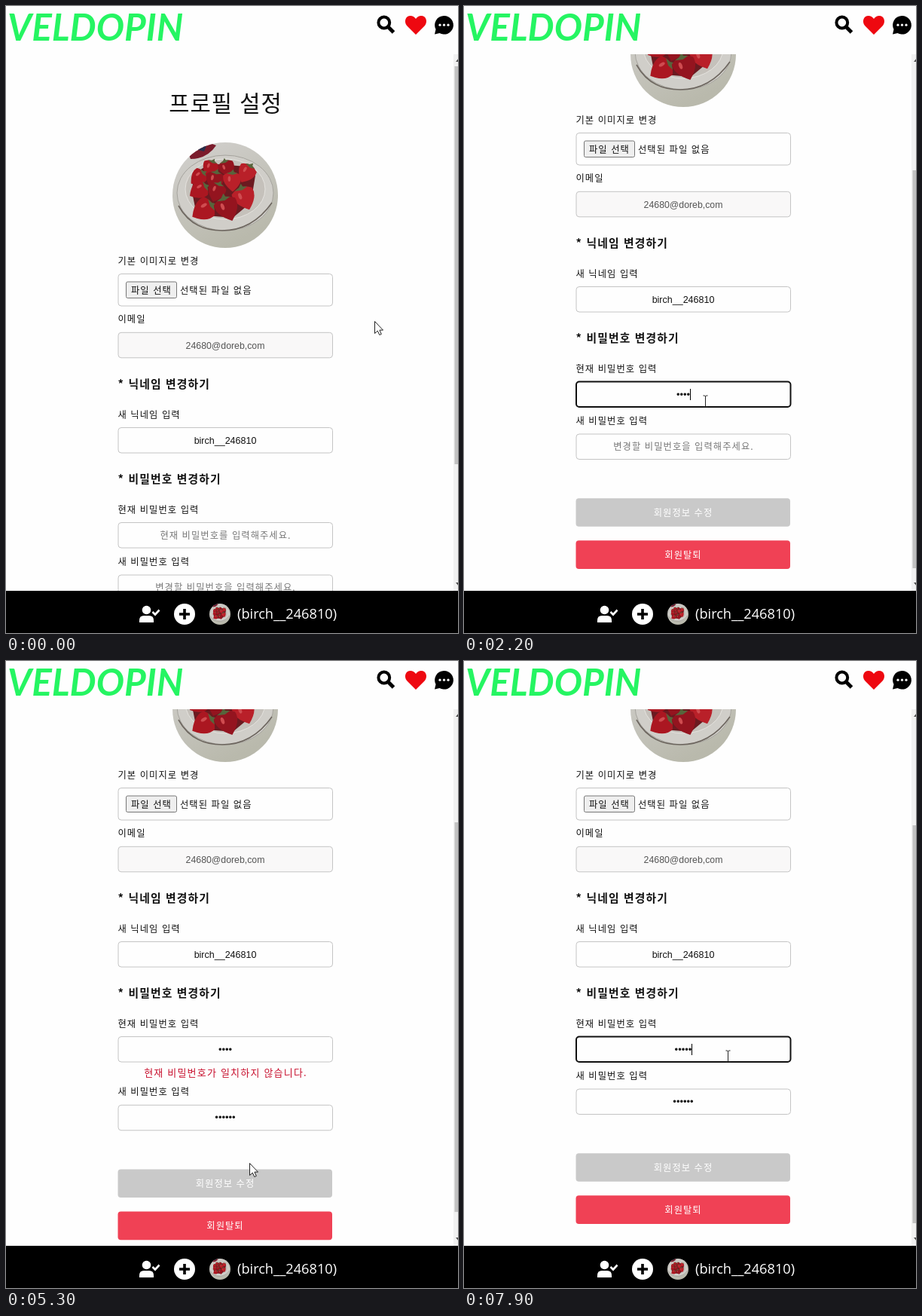
An HTML page that plays this animation: 600 by 832 pixels, repeating every 8 s.

```html
<!DOCTYPE html>
<html lang="ko">
<head>
<meta charset="utf-8">
<title>프로필 설정</title>
<style>
  html, body { margin: 0; width: 100%; height: 100%; overflow: hidden; background: #fefefe; }
  svg { display: block; }
  text { font: 12.3px "Liberation Sans", "Noto Sans CJK KR", "Noto Sans CJK", sans-serif; fill: #111; }
  .ko { font-family: "Noto Sans CJK KR", "Noto Sans CJK", sans-serif; letter-spacing: 1.05px; }
  .mid { text-anchor: middle; }
  .title { font-size: 29.6px; font-weight: 300; letter-spacing: 1px; }
  .head { font-size: 14.8px; font-weight: 700; letter-spacing: 1.15px; }
  .hint { fill: #777; }
  .white { fill: #fff; }
  .error { font-size: 13px; letter-spacing: 1.2px; fill: #c8102e; }
  .mail { fill: #545454; }
  .nick { font-size: 12.5px; }
  .dots { font-size: 13px; }
  .brand { font: italic 700 49.5px Lato, sans-serif; fill: #25f562; }
  .user { font: 18.2px "Open Sans", "Noto Sans", sans-serif; fill: #fff; }
  .box { fill: #fefefe; stroke: #c4c4c4; }
  .focus { stroke: #101010; stroke-width: 2; }
</style>
</head>
<body>
<svg width="600" height="832" viewBox="0 0 600 832">
  <defs>
    <clipPath id="view"><rect y="64" width="600" height="712"/></clipPath>
    <clipPath id="disc"><circle r="70"/></clipPath>
    <linearGradient id="table" x2=".5" y2="1">
      <stop stop-color="#d3d1cf"/><stop offset="1" stop-color="#b9b9ac"/>
    </linearGradient>
    <g id="photo" clip-path="url(#disc)">
      <rect x="-70" y="-70" width="140" height="140" fill="url(#table)"/>
      <path d="M-50-58Q-30-76-12-66Q-24-48-46-48Z" fill="#7b1c2c"/>
      <path d="M-44-62L-24-68L-28-58Z" fill="#26304c"/>
      <ellipse cy="-3" rx="64" ry="50" fill="#d0cec9" stroke="#a5a39d"/>
      <ellipse cy="-8" rx="53" ry="40" fill="#c5c1bb" stroke="#e4e2de"/>
      <path d="M-62 14Q-44 47-4 47T62 10" fill="none" stroke="#6d665f" stroke-width="1.6"/>
      <path d="M-42-28L-20-42L28-38L40-26L34 10L10 30L-38 26L-44-4Z" fill="#6b1a20"/>
      <g id="fruit"></g>
    </g>
  </defs>

  <rect width="600" height="832" fill="#fefefe"/>

  <g clip-path="url(#view)">
    <g id="page">
      <text class="ko title mid" x="291.5" y="140">프로필 설정</text>
      <use href="#photo" x="291" y="251"/>
      <text class="ko" x="148.5" y="342.5">기본 이미지로 변경</text>
      <rect class="box" x="149" y="355.5" width="284.5" height="42.5" rx="4"/>
      <rect x="159.5" y="366" width="67" height="21.5" rx="2" fill="#efefef" stroke="#777"/>
      <text class="ko" x="166" y="381.5">파일 선택</text>
      <text class="ko" x="231" y="381.5">선택된 파일 없음</text>
      <text class="ko" x="148.5" y="420">이메일</text>
      <rect class="box" x="149" y="433.3" width="284.5" height="33.5" rx="4" style="fill:#f9f8f8"/>
      <text class="mail mid" x="291" y="454.5">24680@doreb,com</text>
      <text class="ko head" x="148.5" y="506.7">* 닉네임 변경하기</text>
      <text class="ko" x="148.5" y="546.5">새 닉네임 입력</text>
      <rect class="box" x="149" y="559.5" width="284.5" height="33.5" rx="4"/>
      <text class="nick mid" x="291" y="580.5">birch__246810</text>
      <text class="ko head" x="148.5" y="632.7">* 비밀번호 변경하기</text>
      <text class="ko" x="148.5" y="672.5">현재 비밀번호 입력</text>
      <g id="current">
        <rect class="box" x="149" y="685.5" width="284.5" height="33.5" rx="4"/>
        <text class="ko hint mid" x="291.5" y="706.5">현재 비밀번호를 입력해주세요.</text>
        <text class="dots mid" x="291" y="707"></text>
        <rect class="caret" y="695" width="1" height="15"/>
      </g>
      <text class="ko error mid" id="error" x="291.5" y="738">현재 비밀번호가 일치하지 않습니다.</text>
      <g id="lower">
        <text class="ko" x="148.5" y="742">새 비밀번호 입력</text>
        <g id="next">
          <rect class="box" x="149" y="755" width="284.5" height="33.5" rx="4"/>
          <text class="ko hint mid" x="291.5" y="775.5">변경할 비밀번호을 입력해주세요.</text>
          <text class="dots mid" x="291" y="776"></text>
          <rect class="caret" y="764" width="1" height="15"/>
        </g>
        <rect x="148.5" y="840.3" width="284.5" height="37.5" rx="4" fill="#c9c9c9"/>
        <text class="ko white mid" x="291" y="864">회원정보 수정</text>
        <rect x="148.5" y="896.2" width="284.5" height="37.7" rx="4" fill="#f04155"/>
        <text class="ko white mid" x="291" y="920">회원탈퇴</text>
      </g>
    </g>
    <rect x="594" y="64" width="6" height="712" fill="#f1f1f1"/>
    <rect id="thumb" x="595.5" width="5" fill="#c1c1c1"/>
    <path d="M597 74L601 69V74ZM597 765L601 770V765Z" fill="#505050"/>
  </g>

  <text class="brand" x="2" y="46">VELDOPIN</text>
  <g fill="none" stroke="#000" stroke-width="4">
    <circle cx="501.8" cy="22" r="7.4"/>
    <path d="M507 27.5L514.5 35" stroke-width="5"/>
  </g>
  <path d="M544 38L532 26C528 21 530 13 537 13Q541 13 544 17Q547 13 551 13C558 13 560 21 556 26Z" fill="#ee0810"/>
  <path d="M581.5 13A12.3 12.3 0 1 1 575.5 36L569 37.5L570.5 31A12.3 12.3 0 0 1 581.5 13Z"/>
  <g fill="#fff"><circle cx="576" cy="25.2" r="1.6"/><circle cx="581.5" cy="25.2" r="1.6"/><circle cx="587" cy="25.2" r="1.6"/></g>

  <rect y="776" width="600" height="56"/>
  <g fill="#fff">
    <circle cx="186.5" cy="801.5" r="5.8"/>
    <path d="M177 818V815Q177 809 183 809H190Q196 809 196 815V818Z"/>
    <path d="M194.5 804L198 807.5L203.5 801.5" fill="none" stroke="#fff" stroke-width="2.6"/>
    <circle cx="237" cy="807" r="14"/>
  </g>
  <path d="M230 807H244M237 800V814" stroke="#000" stroke-width="3.6"/>
  <use href="#photo" transform="translate(284 807) scale(.2)"/>
  <text class="user" x="307" y="812.5">(birch__246810)</text>

  <path id="arrow" d="M0 0V16L3.8 12.6L6.3 18L8.8 16.9L6.4 11.6H11Z" fill="#fff" stroke="#222"/>
  <path id="beam" d="M-3-7.5H-1L0-6.5L1-7.5H3M0-6.5V6.5M-3 7.5H-1L0 6.5L1 7.5H3" fill="none" stroke="#222"/>
</svg>
<script>
  const LOOP = 8000, STEP = 100;
  const $ = q => document.querySelector(q);

  // Strawberries around the photo's centre: x, y, tilt, size
  const berries = [[-20, -36, 20, .8], [2, -36, -20, .8], [28, -30, 30, .9], [-36, -24, 50, .8],
    [-14, -20, 10, .9], [9, -19, 0, .9], [-35, -7, 60, .9], [-12, -5, 20, .9],
    [25, 3, -20, 1.1], [-29, 19, 60, 1.1], [2, 17, -20, 1.15]];
  $('#fruit').innerHTML = berries.map(([x, y, tilt, size], i) => `
    <g transform="translate(${x} ${y}) rotate(${tilt}) scale(${size})">
      <path d="M-13-8Q0-18 13-8Q16 4 1 16Q-15 4-13-8Z" fill="${['#ab1721', '#94141f', '#b92029'][i % 3]}"/>
      <path d="M-8-11L-2-13L2-17L3-13L8-11L1-9Z" fill="#57653c"/>
      <ellipse cx="-4" cy="-3" rx="2" ry="4" fill="#cf4c50"/>
    </g>`).join('');

  // Keys: [time, value, ...]
  const scrollKeys = [[100, 0], [500, 141], [700, 187]];
  const pointerKeys = [[0, 489, 418], [100, 489, 418], [500, 386, 486], [900, 320, 524],
    [2700, 320, 524], [3200, 293, 576], [4600, 293, 576], [5000, 323, 666],
    [5400, 323, 666], [5800, 350, 524]];
  const currentKeys = [[0, 0], [1300, 1], [1500, 2], [1700, 3], [1900, 4], [6500, 3], [7300, 4], [7600, 5]];
  const nextKeys = [[0, 0], [3700, 1], [3800, 2], [4000, 3], [4100, 4], [4300, 5], [4400, 6]];
  const focusKeys = [[0, ''], [1000, 'current'], [3300, 'next'], [4900, ''], [5900, 'current']];

  const held = (keys, t) => keys.filter(k => k[0] <= t).pop();

  function tween(keys, t) {
    const i = keys.findIndex(k => k[0] > t);
    if (i < 0) return keys[keys.length - 1].slice(1);
    if (i === 0) return keys[0].slice(1);
    const a = keys[i - 1], b = keys[i], p = (t - a[0]) / (b[0] - a[0]);
    return a.slice(1).map((v, n) => v + (b[n + 1] - v) * p);
  }

  const show = (el, on) => el.setAttribute('visibility', on ? 'visible' : 'hidden');
  const move = (el, x, y) => el.setAttribute('transform', `translate(${x} ${y})`);

  function drawField(id, count, focus, t) {
    const part = c => $(`#${id} .${c}`);
    const active = focus[1] === id;
    part('box').classList.toggle('focus', active);
    part('dots').textContent = '•'.repeat(count);
    show(part('hint'), !count);
    part('caret').setAttribute('x', 291 + Math.round(count * 2.28));
    show(part('caret'), active && Math.floor((t - focus[0]) / 500) % 2 === 0);
  }

  function draw(t) {
    const scroll = Math.round(tween(scrollKeys, t)[0]);
    const failed = t >= 4900 && t < 6500;
    const focus = held(focusKeys, t);
    move($('#page'), 0, -scroll);
    move($('#lower'), 0, failed ? 21.3 : 0);
    show($('#error'), failed);
    $('#thumb').setAttribute('y', 80 + scroll * (failed ? .717 : .738));
    $('#thumb').setAttribute('height', failed ? 517 : 528);
    drawField('current', held(currentKeys, t)[1], focus, t);
    drawField('next', held(nextKeys, t)[1], focus, t);

    const [x, y] = tween(pointerKeys, t).map(Math.round);
    const top = y + scroll, drop = failed ? 21 : 0;
    const inside = (a, b) => top > a && top < b;
    const typing = x > 149 && x < 434 && (inside(685, 720) || inside(754 + drop, 789 + drop));
    show($('#arrow'), !typing);
    show($('#beam'), typing);
    move($('#arrow'), x + .5, y + .5);
    move($('#beam'), x + .5, y + .5);
  }

  const start = performance.now();
  function tick() {
    const t = (performance.now() - start) % LOOP;
    draw(Math.floor(t / STEP) * STEP);
    requestAnimationFrame(tick);
  }
  tick();
</script>
</body>
</html>
```
